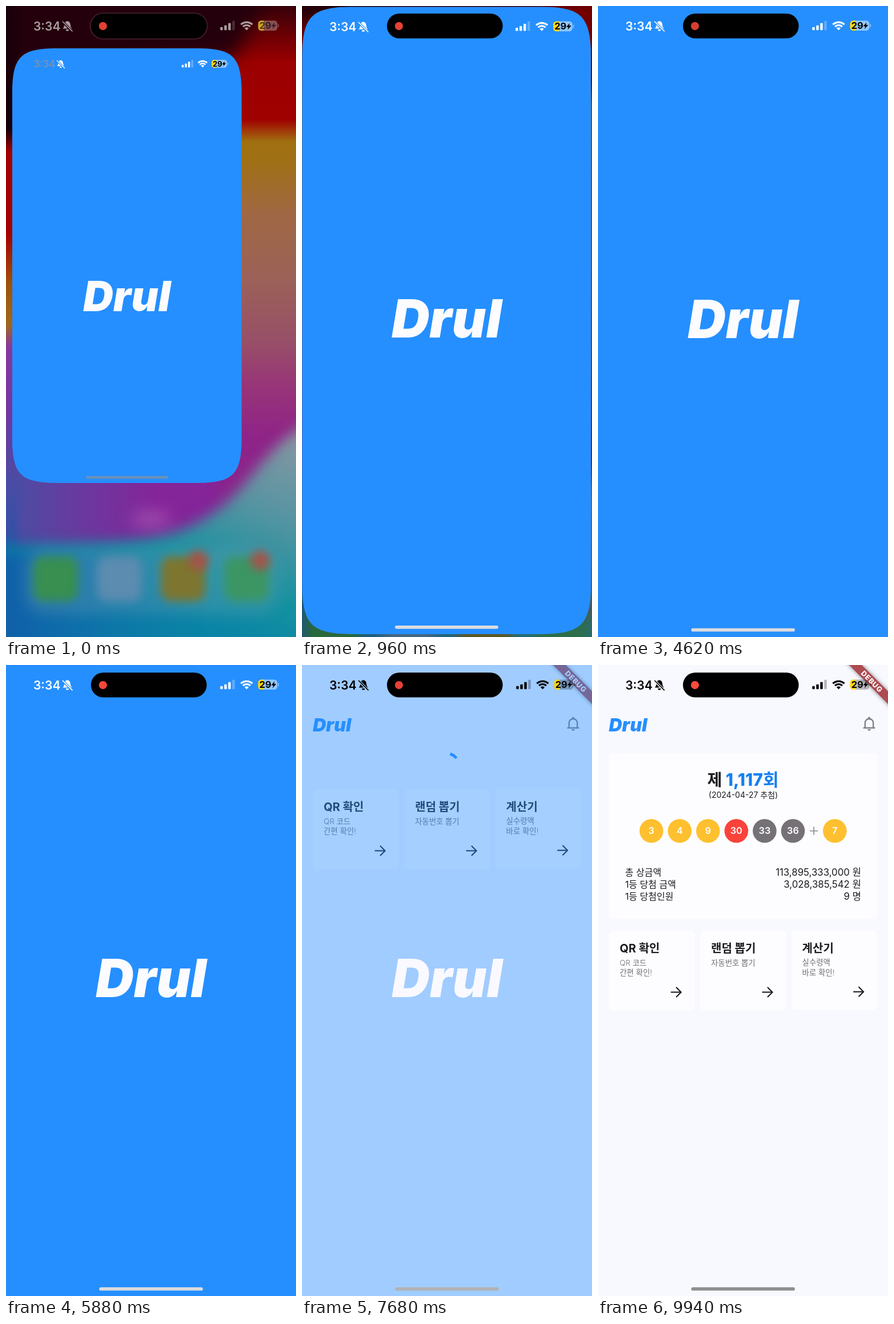
These frames come from a looping animation (508x1102 px, 9960 ms). An HTML page with a canvas:

```html
<!DOCTYPE html>
<html lang="ko">
<head>
<meta charset="utf-8">
<title>App launch</title>
<style>
  html, body { margin: 0; width: 100%; height: 100%; overflow: hidden; background: #258fff; }
  canvas { display: block; width: 508px; height: 1102px; }
</style>
</head>
<body>
<canvas id="stage" width="508" height="1102"></canvas>
<script>
const W = 508, H = 1102, LOOP = 9.96;
const FAMILY = 'Inter, "Noto Sans CJK KR", "Noto Sans CJK", sans-serif';
const BLUE = '#258fff', INK = '#1c1c20';
const BRAND = 'Drul';
const stage = document.getElementById('stage').getContext('2d');
const layer = newCanvas();
const home = newCanvas();

function newCanvas() {
  const c = document.createElement('canvas');
  c.width = W;
  c.height = H;
  return c.getContext('2d');
}

const lerp = (a, b, u) => a + (b - a) * u;
const ramp = (t, a, b) => Math.min(1, Math.max(0, (t - a) / (b - a)));
const smooth = u => u * u * (3 - 2 * u);
const mix = (a, b, u) => `rgb(${a.map((v, i) => Math.round(lerp(v, b[i], u)))})`;

// Linear or eased interpolation through [time, value] points.
function track(points, t, ease = u => u) {
  for (let i = 1; i < points.length; i++) {
    const [t0, a] = points[i - 1], [t1, b] = points[i];
    if (t <= t1) return lerp(a, b, ease(ramp(t, t0, t1)));
  }
  return points[points.length - 1][1];
}

function text(c, s, x, y, size, weight, color, align = 'left', style = '') {
  c.font = `${style} ${weight} ${size}px ${FAMILY}`;
  c.textAlign = align;
  c.fillStyle = color;
  c.fillText(s, x, y);
}

function box(c, x, y, w, h, r, color) {
  c.fillStyle = color;
  c.beginPath();
  c.roundRect(x, y, w, h, r);
  c.fill();
}

function disc(c, x, y, r, color) {
  c.fillStyle = color;
  c.beginPath();
  c.arc(x, y, r, 0, Math.PI * 2);
  c.fill();
}

function line(c, color, width, ...pts) {
  c.strokeStyle = color;
  c.lineWidth = width;
  c.beginPath();
  pts.forEach(([x, y], i) => i ? c.lineTo(x, y) : c.moveTo(x, y));
  c.stroke();
}

function gradient(c, x0, y0, x1, y1, stops) {
  const g = c.createLinearGradient(x0, y0, x1, y1);
  stops.forEach(([p, color]) => g.addColorStop(p, color));
  return g;
}

function paintHome(c) {
  c.fillStyle = gradient(c, 0, 0, 0, H, [
    [0, '#38000a'], [.05, '#700004'], [.09, '#9c0000'], [.18, '#a00000'],
    [.215, '#a07010'], [.25, '#a07018'], [.33, '#a06844'], [.43, '#9c6258'],
    [.53, '#985068'], [.6, '#983678'], [.68, '#902488'], [1, '#80259a']]);
  c.fillRect(0, 0, W, H);

  c.filter = 'blur(16px)';
  c.fillStyle = '#24000c';
  c.beginPath();
  c.moveTo(-60, -60);
  c.lineTo(480, -60);
  c.lineTo(400, 90);
  c.lineTo(-60, 120);
  c.fill();

  c.fillStyle = gradient(c, 0, 0, 260, 0, [[0, '#4650a4'], [.35, '#6040a0'], [1, '#85259a']]);
  c.fillRect(-60, 740, 430, 420);

  c.filter = 'blur(5px)';
  c.fillStyle = gradient(c, 0, 0, 0, H, [
    [0, '#1c000c'], [.195, '#160008'], [.23, '#a40000'], [.36, '#a40000'],
    [.44, '#a05008'], [.505, '#a06818'], [.54, '#8838a0'], [.65, '#7038a0'],
    [.75, '#4c4ca4'], [1, '#0858a8']]);
  c.fillRect(-30, -30, 50, H + 60);

  c.filter = 'blur(12px)';
  c.fillStyle = gradient(c, 500, 750, 360, 1090, [
    [0, '#8498a2'], [.35, '#5a94a2'], [.75, '#1492a0'], [1, '#0a84a6']]);
  c.beginPath();
  c.moveTo(560, 715);
  c.bezierCurveTo(440, 760, 440, 850, 330, 905);
  c.bezierCurveTo(250, 945, 120, 935, -60, 945);
  c.lineTo(-60, 1160);
  c.lineTo(560, 1160);
  c.fill();

  c.fillStyle = gradient(c, 0, 0, 330, 0, [[0, '#1060a8'], [.4, 'rgba(16,104,172,.7)'], [1, 'rgba(16,110,170,0)']]);
  c.fillRect(-60, 955, 420, 220);
  box(c, 32, 946, 444, 116, 36, 'rgba(110,160,185,.32)');
  c.filter = 'blur(14px)';
  box(c, 222, 884, 64, 24, 12, 'rgba(190,120,200,.5)');

  c.filter = 'blur(8px)';
  ['#388f50', '#5c8cb0', '#7e7630', '#3c9664'].forEach((color, i) =>
    box(c, 48 + 111.5 * i, 961, 78, 78, 18, color));
  disc(c, 337, 968, 17, '#a4544c');
  disc(c, 445, 968, 17, '#a4544c');
  c.filter = 'none';
}

function mutedBell(c, color) {
  c.save();
  // leave a clear gap beside the slash
  c.beginPath();
  c.rect(96, 24, 24, 22);
  [[95.5, 26.8], [98.5, 23.8], [120, 45.2], [117, 48.2]]
    .forEach(([x, y], i) => i ? c.lineTo(x, y) : c.moveTo(x, y));
  c.closePath();
  c.clip('evenodd');
  c.fillStyle = color;
  c.beginPath();
  c.moveTo(99.5, 39.6);
  c.quadraticCurveTo(102, 37, 102.3, 32.5);
  c.bezierCurveTo(102.8, 24.5, 112.2, 24.5, 112.7, 32.5);
  c.quadraticCurveTo(113, 37, 115.5, 39.6);
  c.closePath();
  c.fill();
  c.beginPath();
  c.arc(107.5, 41, 2.7, 0, Math.PI);
  c.fill();
  c.restore();
  c.lineCap = 'round';
  line(c, color, 1.6, [99.3, 27.3], [116, 43.9]);
  c.lineCap = 'butt';
}

function wifi(c, color) {
  const x = 421.5, y = 42.5;
  c.strokeStyle = color;
  c.lineWidth = 3.2;
  [14.2, 9].forEach(r => {
    c.beginPath();
    c.arc(x, y, r, -Math.PI * .75, -Math.PI * .25);
    c.stroke();
  });
  c.fillStyle = color;
  c.beginPath();
  c.moveTo(x, y);
  c.arc(x, y, 5.2, -Math.PI * .75, -Math.PI * .25);
  c.fill();
}

// tone: 0 white, 1 black
function statusBar(c, tone, timeColor) {
  const v = Math.round(255 * (1 - tone));
  const color = `rgb(${v},${v},${v})`;
  const faint = a => `rgba(${v},${v},${v},${a})`;
  text(c, '3:34', 48, 42.5, 21, 600, timeColor || color);
  mutedBell(c, color);
  [5.5, 8.5, 12.5, 16.5].forEach((h, i) =>
    box(c, 375.3 + 7 * i, 42.3 - h, 4.4, h, 1.2, i < 3 ? color : faint(.28)));
  wifi(c, color);

  c.save();
  c.beginPath();
  c.roundRect(441.7, 25.5, 33.6, 17.6, 5.5);
  c.clip();
  c.fillStyle = faint(lerp(.5, .26, tone));
  c.fillRect(441, 25, 36, 19);
  c.fillStyle = '#ffd60a';
  c.fillRect(441, 25, 10.5, 19);
  c.restore();
  box(c, 476.3, 31.5, 1.8, 5.6, 1, faint(.45));
  text(c, '29', 454.2, 40.2, 16.5, 700, '#000', 'center');
  c.beginPath();
  [[470.5, 28.5], [464.5, 35.6], [468.3, 35.6], [466.8, 40.5], [473.4, 33], [469.6, 33]]
    .forEach(([x, y]) => c.lineTo(x, y));
  c.fill();
}

function island(c, t) {
  box(c, 148.8, 13.2, 202.8, 43.4, 21.7, '#000');
  const glow = track([[0, .45], [.48, .6], [1.94, .25], [3.35, 1], [4.76, .25],
    [6.4, 1], [8.2, .4], [9.94, 1]], t, u => .5 - .5 * Math.cos(Math.PI * u));
  disc(c, 169.8, 35.1, 7.1, mix([200, 58, 44], [255, 74, 60], glow));
}

function squircle(c, x, y, w, h, e) {
  const k = e * .17, r = x + w, b = y + h;
  c.beginPath();
  c.moveTo(x + e, y);
  c.lineTo(r - e, y);
  c.bezierCurveTo(r - k, y, r, y + k, r, y + e);
  c.lineTo(r, b - e);
  c.bezierCurveTo(r, b - k, r - k, b, r - e, b);
  c.lineTo(x + e, b);
  c.bezierCurveTo(x + k, b, x, b - k, x, b - e);
  c.lineTo(x, y + e);
  c.bezierCurveTo(x, y + k, x + k, y, x + e, y);
  c.closePath();
}

function splash(c) {
  c.fillStyle = BLUE;
  c.fillRect(0, 0, W, H);
  text(c, BRAND, 254, 580, 92, 900, '#fcfcff', 'center', 'italic');
}

function indicator(c, color, bottom = H) {
  box(c, 163.3, bottom - 15.2, 181.6, 5.8, 2.9, color);
}

function launch(c, t) {
  // tail of a critically damped spring, 1 at t = 0
  const rest = (3.35 + 5.1 * t) / 3.35 * Math.exp(-5.1 * t);
  const x = 10.8 * rest, y = 74 * rest;
  const w = W - 95.5 * rest - x, h = H - 270 * rest - y;
  const scale = w / W;

  // the wallpaper zooms in and darkens behind the growing card
  const grow = .1 * (1 - rest);
  c.drawImage(home.canvas, -W * grow, -H * grow, W * (1 + 2 * grow), H * (1 + 2 * grow));
  c.fillStyle = `rgba(0,0,0,${.27 * (1 - rest)})`;
  c.fillRect(0, 0, W, H);
  c.save();
  c.globalAlpha = .62 * rest * rest;
  statusBar(c, 0);
  c.restore();

  c.save();
  squircle(c, x, y, w, h, t < 1.4 ? lerp(92, 82, rest) : 0);
  c.clip();
  c.translate(x, y);
  c.scale(scale, scale);
  splash(c);
  statusBar(c, 0, mix([255, 255, 255], [122, 146, 178], rest));
  indicator(c, mix([220, 220, 226], [112, 145, 182], rest), h / scale);
  c.restore();

  c.strokeStyle = `rgba(90,50,65,${.6 * rest})`;
  c.lineWidth = 2;
  c.beginPath();
  c.roundRect(147.5, 12.5, 205, 45, 22.5);
  c.stroke();
}

function bell(c) {
  const color = '#7c7c82';
  c.strokeStyle = color;
  c.lineWidth = 2.3;
  c.beginPath();
  c.moveTo(467.8, 109);
  c.lineTo(467.8, 101.5);
  c.bezierCurveTo(467.8, 91.5, 482.2, 91.5, 482.2, 101.5);
  c.lineTo(482.2, 109);
  c.moveTo(464.6, 109.8);
  c.lineTo(485.4, 109.8);
  c.stroke();
  box(c, 473.2, 90.6, 3.6, 4.5, 1.8, color);
  c.beginPath();
  c.arc(475, 112, 2.7, 0, Math.PI);
  c.fill();
}

function ribbon(c) {
  c.save();
  c.translate(W, 0);
  c.rotate(Math.PI / 4);
  c.shadowColor = 'rgba(0,0,0,.5)';
  c.shadowBlur = 7;
  c.fillStyle = '#ae4b50';
  c.fillRect(-60, 32.6, 120, 15.5);
  c.shadowColor = 'transparent';
  c.letterSpacing = '0.8px';
  text(c, 'DEBUG', .4, 44.9, 12.6, 800, '#fff', 'center');
  c.restore();
}

function drawResult(c) {
  box(c, 19, 154, 471, 290, 8, '#fdfdff');

  const lead = '제 ', round = '1,117회';
  c.font = ` 700 28px ${FAMILY}`;
  const a = c.measureText(lead).width;
  c.font = ` 800 30px ${FAMILY}`;
  const x = 254 - (a + c.measureText(round).width) / 2;
  text(c, lead, x, 210.8, 28, 700, INK);
  text(c, round, x + a, 211, 30, 800, '#1580f0');
  text(c, '(2024-04-27 추첨)', 254.5, 232, 14, 400, INK, 'center');

  const yellow = '#fec02f', red = '#fb423b', gray = '#757176';
  [[3, yellow], [4, yellow], [9, yellow], [30, red], [33, gray], [36, gray], [7, yellow]]
    .forEach(([n, color], i) => {
      const cx = i < 6 ? 93.5 + 49.6 * i : 414.8;
      disc(c, cx, 289.7, 20.8, color);
      text(c, n, cx, 295.4, 16.3, 600, '#fff', 'center');
    });
  line(c, '#96969a', 1.8, [371, 289.7], [385.2, 289.7]);
  line(c, '#96969a', 1.8, [378.1, 282.6], [378.1, 296.8]);

  [['총 상금액', '113,895,333,000 원'], ['1등 당첨 금액', '3,028,385,542 원'], ['1등 당첨인원', '9 명']]
    .forEach(([label, value], i) => {
      const y = 367.8 + 21.3 * i;
      text(c, label, 47.5, y, 16, 400, INK);
      text(c, value, 461, y, 16.8, 400, INK, 'right');
    });
}

function spinner(c, t) {
  const u = (t - 7.5) / .18, deg = Math.PI / 180;
  c.strokeStyle = BLUE;
  c.lineWidth = 5;
  c.beginPath();
  c.arc(254, 175.5, 20.8, (-90 + 15 * u) * deg, (-90 + 52 * u) * deg);
  c.stroke();
}

function tile(c, x, y, w, h, title, notes) {
  box(c, x, y, w, h, 8, '#fdfdff');
  const left = x + 19;
  text(c, title, left, y + 38.4, 20, 700, INK);
  notes.forEach((s, i) => text(c, s, left, y + 61 + 17.2 * i, 13.4, 300, '#707074'));
  const ax = x + 126.5, ay = y + 107.4;
  line(c, INK, 2.1, [ax - 18, ay], [ax, ay]);
  line(c, INK, 2.1, [ax - 8.6, ay - 8.6], [ax, ay], [ax - 8.6, ay + 8.6]);
}

function page(c, t) {
  c.fillStyle = '#f8f8ff';
  c.fillRect(0, 0, W, H);
  text(c, BRAND, 19, 115.5, 32, 900, BLUE, 'left', 'italic');
  bell(c);
  const loaded = t >= 7.84;
  if (loaded) drawResult(c); else spinner(c, t);
  const y = loaded ? 464 : 217;
  tile(c, 19, y, 150.5, 140, 'QR 확인', ['QR 코드', '간편 확인!']);
  tile(c, 179, y, 150.5, 140, '랜덤 뽑기', ['자동번호 뽑기']);
  tile(c, 338.6, y - .7, 151, 139, '계산기', ['실수령액', '바로 확인!']);
  ribbon(c);
}

function render(t) {
  const c = stage;
  if (t < 1.8) {
    launch(c, t);
  } else {
    const fade = ramp(t, 7.51, 7.8);
    if (fade < 1) splash(c);
    if (fade > 0) {
      page(layer, t);
      c.globalAlpha = fade;
      c.drawImage(layer.canvas, 0, 0);
      c.globalAlpha = 1;
    }
    statusBar(c, smooth(ramp(t, 6.75, 7.05)));
    const v = Math.round(track([[7.45, 220], [7.68, 178], [7.96, 183], [9.94, 142]], t));
    indicator(c, `rgb(${v},${v},${v + 2})`);
  }
  island(c, t);
}

function tick() {
  render(performance.now() / 1000 % LOOP);
  requestAnimationFrame(tick);
}

paintHome(home);
tick();
</script>
</body>
</html>
```
